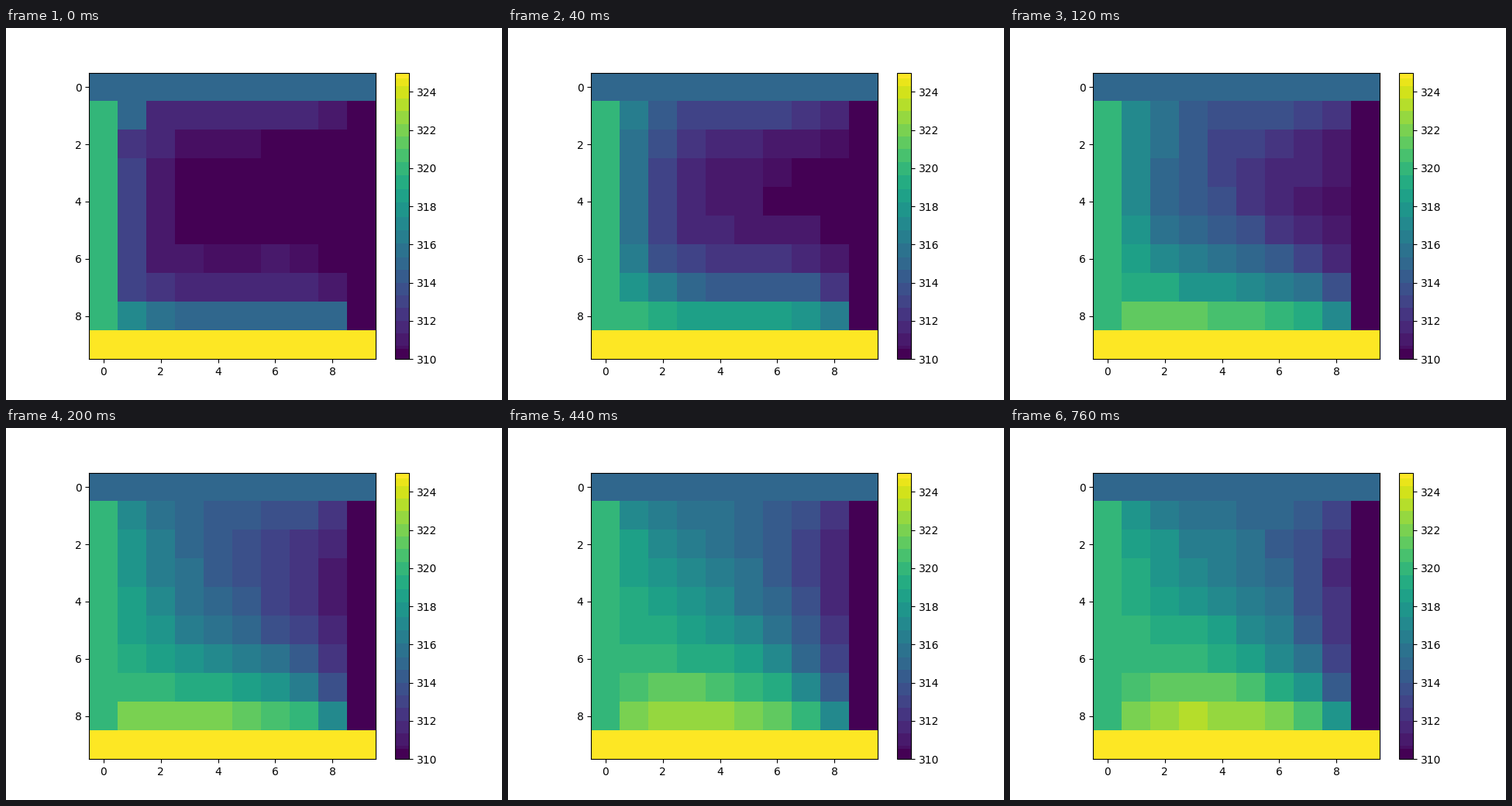
A matplotlib script that plays this animation: 640 px wide and 480 px high, repeating every 1.83 s.

```python
import numpy as np
import matplotlib.pyplot as plt
from matplotlib.animation import FuncAnimation
from matplotlib.colors import ListedColormap

SIZE = 10
SWEEPS = 39
INTERVAL = 10          # ms
FRAMES = 183
FRAMES_PER_SWEEP = 2

# Colour map indices at which a new flat band starts
BANDS = [0, 9, 12, 23, 34, 46, 57, 68, 80, 91, 103, 115, 127, 140,
         152, 164, 176, 188, 199, 210, 222, 233, 244, 251, 256]


def banded_viridis():
    base = plt.get_cmap("viridis")
    colors = np.empty((256, 4))
    for lo, hi in zip(BANDS, BANDS[1:]):
        colors[lo:hi] = base((lo + hi - 1) // 2)
    colors[:BANDS[1]] = base(0)
    colors[BANDS[-2]:] = base(255)
    return ListedColormap(colors)


def spiral(n):
    """Inner cells, ring by ring, counter-clockwise from the left column."""
    for a in range(1, n // 2):
        b = n - 1 - a
        yield from ((i, a) for i in range(a + 1, b + 1))
        yield from ((b, j) for j in range(a + 1, b + 1))
        yield from ((i, b) for i in range(b - 1, a - 1, -1))
        yield from ((a, j) for j in range(b - 1, a - 1, -1))


def solve():
    """Gauss-Seidel sweeps of the Laplace equation on a heated plate."""
    t = np.full((SIZE, SIZE), 310.0)
    t[:, 0] = 320
    t[0, :] = 315
    t[1:, -1] = 310
    t[-1, :] = 325
    path = list(spiral(SIZE))
    states = []
    for _ in range(SWEEPS):
        for i, j in path:
            t[i, j] = (t[i - 1, j] + t[i + 1, j] + t[i, j - 1] + t[i, j + 1]) / 4
        states.append(t.copy())
    return states


states = solve()
fig, ax = plt.subplots(figsize=(6.4, 4.8), dpi=100)
image = ax.imshow(states[0], cmap=banded_viridis(), vmin=310, vmax=325,
                  interpolation="nearest")
fig.colorbar(image, ax=ax)


def draw(frame):
    image.set_data(states[min(frame // FRAMES_PER_SWEEP, SWEEPS - 1)])
    return [image]


def reset():
    return draw(0)


anim = FuncAnimation(fig, draw, frames=FRAMES, init_func=reset,
                     interval=INTERVAL, repeat=True, repeat_delay=0)
plt.show()
```
